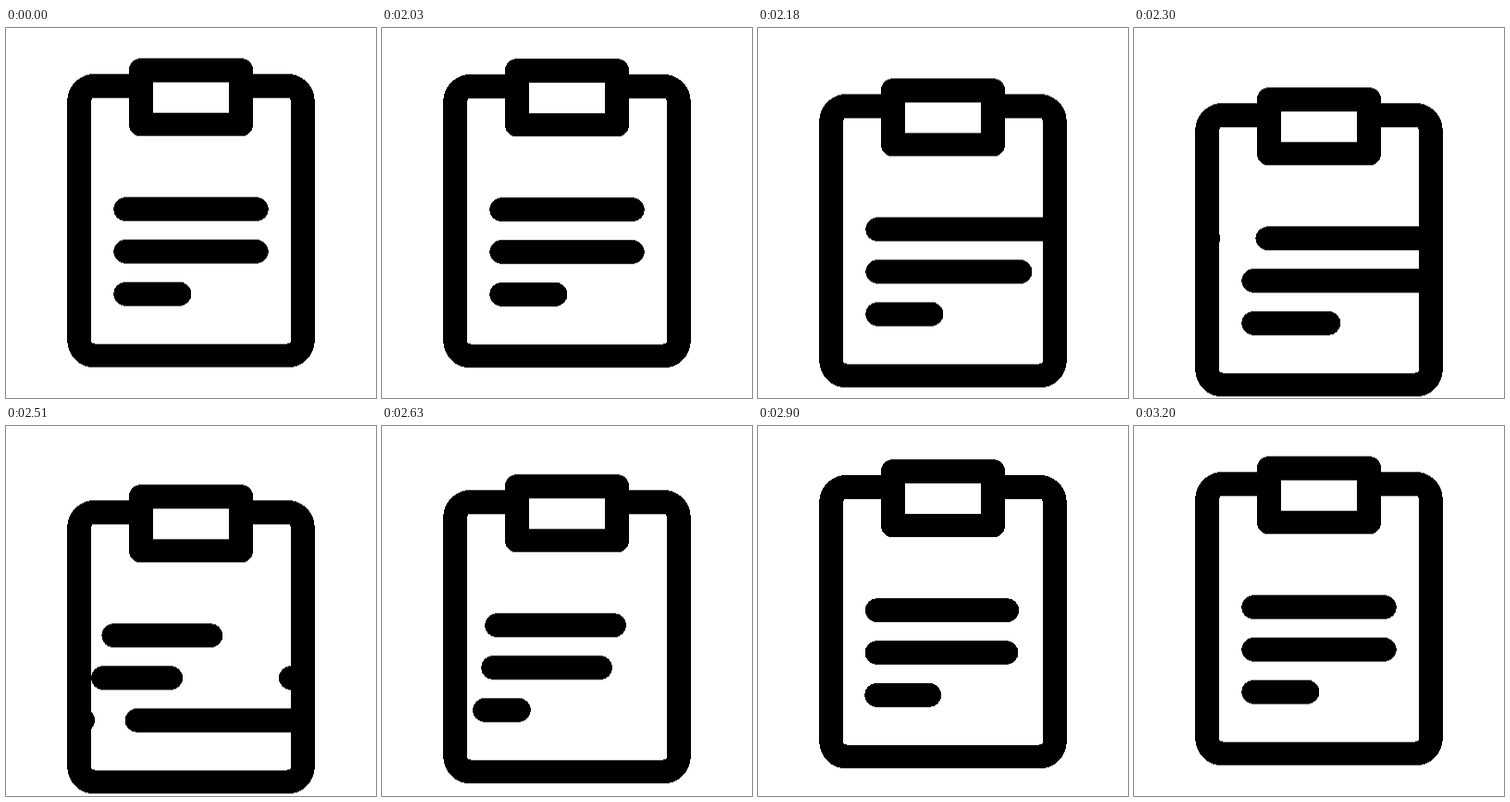
These frames come from a looping animation (400x400 px, 3.26 s). An HTML page without scripts:

```html
<!DOCTYPE html>
<html lang="en">
<head>
<meta charset="utf-8">
<title>Clipboard</title>
<style>
  @property --lead  { syntax: "<number>"; inherits: true; initial-value: 0; }
  @property --trail { syntax: "<number>"; inherits: true; initial-value: 0; }
  @property --grow  { syntax: "<number>"; inherits: true; initial-value: 0; }

  html, body { margin: 0; width: 100%; height: 100%; overflow: hidden; background: #fff; }
  svg { display: block; width: 100%; height: 100%; shape-rendering: crispEdges; }

  .board { animation: dip 3.26s infinite; }
  .frame { fill: #fff; stroke: #000; stroke-width: 1.555; stroke-linejoin: round; }

  .line {
    --length: 10;
    stroke: #000;
    stroke-width: .055;
    animation: lead 3.26s var(--shift) infinite,
               trail 3.26s var(--shift) infinite,
               var(--enter) 3.26s infinite;
  }
  .line rect { height: 1.5px; rx: .75px; }

  /* The right end runs off first, the left end follows. */
  .leaving {
    x: calc(7px + var(--trail) * 1px);
    width: calc((var(--length) + var(--lead) - var(--trail)) * 1px);
  }
  /* The fresh line grows out of the left border. */
  .entering {
    x: calc(4px + var(--grow) * 3px);
    width: calc(1.5px + (var(--length) - 1.5) * var(--grow) * 1px);
  }

  .first  { --shift: -.214s; --enter: enter-first; }
  .second { --shift: -.106s; --enter: enter-second; }
  .third  { --shift: 0s;     --enter: enter-third; --length: 5; }

  @keyframes dip {
    0%, 61.5% { transform: translateY(0); animation-timing-function: cubic-bezier(.333, 0, .3, 1); }
    73.62% { transform: translateY(2px); animation-timing-function: cubic-bezier(.333, 0, .2, 1); }
    98.16%, 100% { transform: translateY(0); }
  }
  @keyframes lead {
    0%, 68.9% { --lead: 0; animation-timing-function: cubic-bezier(.333, 0, .667, .333); }
    73.8%, 100% { --lead: 11.63; }
  }
  @keyframes trail {
    0%, 75.86% { --trail: 0; animation-timing-function: cubic-bezier(.333, 0, .667, .333); }
    80.46%, 100% { --trail: 11.63; }
  }
  @keyframes enter-first {
    0%, 70.55% { --grow: 0; animation-timing-function: cubic-bezier(.22, 1, .36, 1); }
    98%, 100% { --grow: 1; }
  }
  @keyframes enter-second {
    0%, 73.7% { --grow: 0; animation-timing-function: cubic-bezier(.22, 1, .36, 1); }
    98%, 100% { --grow: 1; }
  }
  @keyframes enter-third {
    0%, 76.85% { --grow: 0; animation-timing-function: cubic-bezier(.22, 1, .36, 1); }
    98%, 100% { --grow: 1; }
  }
</style>
</head>
<body>
<svg viewBox="0 0 24 24">
  <clipPath id="paper"><rect x="4.75" y="4" width="14.5" height="17"/></clipPath>
  <g class="board">
    <rect class="frame" x="4.75" y="3.75" width="14.5" height="17.5" rx="1"/>
    <rect class="frame" x="8.75" y="2.75" width="6.5" height="3.5"/>
    <g clip-path="url(#paper)">
      <g class="line first" transform="translate(0 11)">
        <rect class="leaving"/><rect class="entering"/>
      </g>
      <g class="line second" transform="translate(0 13.75)">
        <rect class="leaving"/><rect class="entering"/>
      </g>
      <g class="line third" transform="translate(0 16.5)">
        <rect class="leaving"/><rect class="entering"/>
      </g>
    </g>
  </g>
</svg>
</body>
</html>
```
